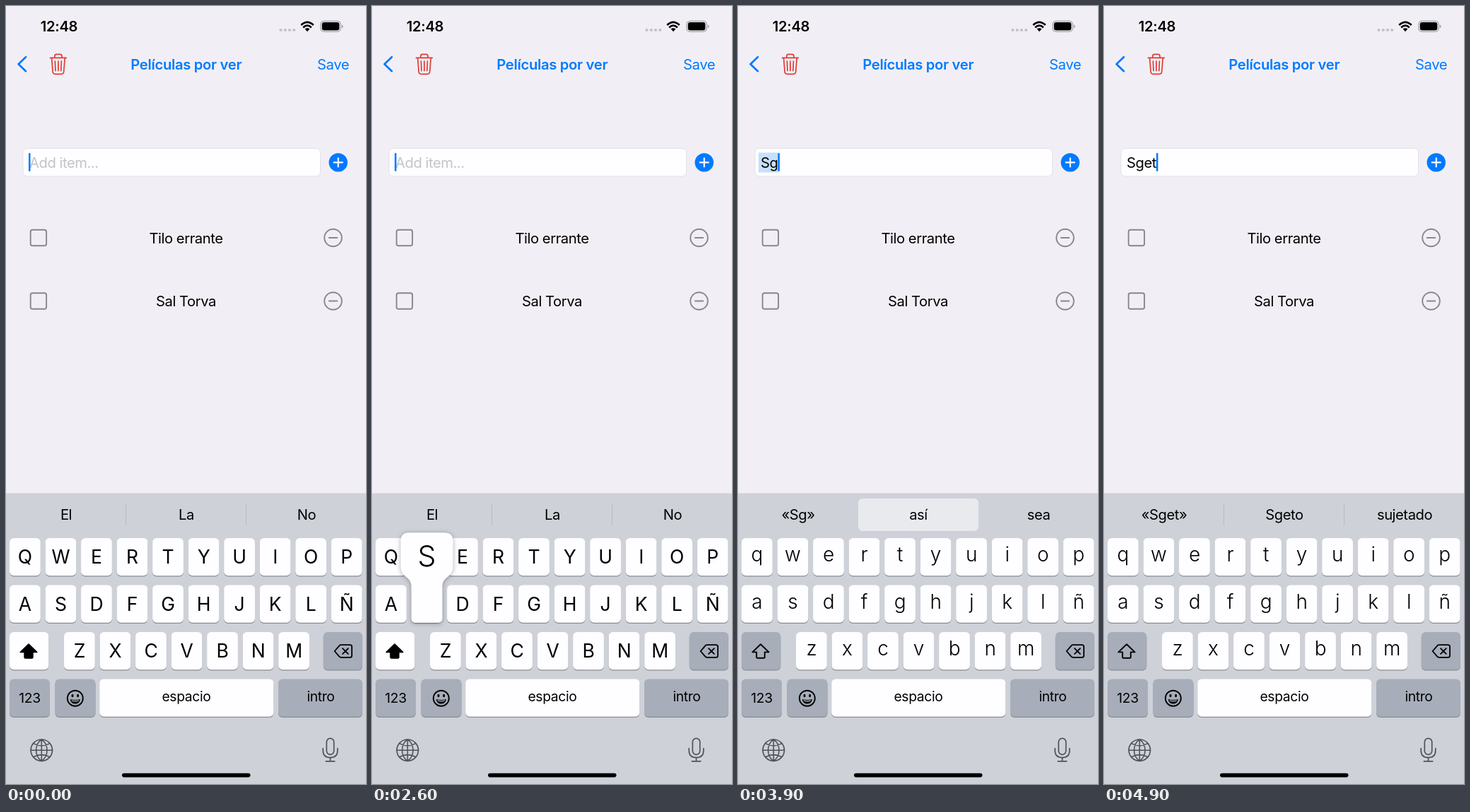
An HTML page that plays this animation: 509 px wide and 1101 px high, repeating every 5 s.

```html
<!DOCTYPE html>
<html lang="es">
<head>
<meta charset="utf-8">
<title>Lista</title>
<style>
  html, body { margin: 0; width: 100%; height: 100%; overflow: hidden; background: #f1eff5; }
  svg { display: block; width: 509px; height: 1101px; }
  text { font-family: Inter, "Open Sans", sans-serif; font-size: 20.2px; letter-spacing: -.45px; white-space: pre; }
  .mid { text-anchor: middle; }
  .bold { font-weight: 600; letter-spacing: -.3px; }
  .blue { fill: #007aff; }
  .upper { font-size: 26.5px; letter-spacing: 0; }
  .lower { font-size: 28px; font-weight: 300; letter-spacing: 0; }
  .big { font-size: 41px; font-weight: 300; letter-spacing: 0; }
  .label { font-size: 19.3px; letter-spacing: -.35px; }
  .line { fill: none; stroke-linecap: round; stroke-linejoin: round; }
  #pop { filter: drop-shadow(0 1px 3px rgba(0, 0, 0, .32)); }
</style>
</head>
<body>
<svg id="stage" viewBox="0 0 509 1101"></svg>
<script>
const LOOP = 5000;
const WHITE = '#fefdff', DARK = '#a7adb9', GREY = '#88878c', BLUE = '#007aff';

// Each table lists [start in ms, value]; a value holds until the next row.
const caretSteps = [[0, 1], [400, .67], [500, .33], [600, 0], [800, .5], [900, 1],
  [1400, .67], [1500, .33], [1600, 0], [1800, .5], [1900, 1],
  [2400, .67], [2500, .33], [2600, 1], [3200, .67], [3300, .33], [3400, 0], [3600, 1]];
const textSteps = [[0, ''], [2700, 'S'], [3700, 'Sg'], [4300, 'Sge'], [4600, 'Sget']];
const pressSteps = [[0, ''], [2600, 'S'], [2700, ''], [3600, 'g'], [3700, ''],
  [4200, 'e'], [4300, ''], [4500, 't'], [4600, '']];
const hintSteps = [[0, ['El', 'La', 'No']], [3000, ['«S»', 'si', 'se']], [3900, ['«Sg»', 'así', 'sea']],
  [4400, ['«Sge»', 'sea', 'Sgeto']], [4800, ['«Sget»', 'Sgeto', 'sujetado']]];
const markSteps = [[0, false], [3900, true], [4700, false]];
const lowerSteps = [[0, false], [2700, true]];

const at = (steps, t) => steps.filter(s => s[0] <= t).pop()[1];
const text = (x, y, str, cls = 'mid', extra = '') => `<text x="${x}" y="${y}" class="${cls}" ${extra}>${str}</text>`;
const box = (x, y, w, h, r, fill, extra = '') =>
  `<rect x="${x}" y="${y}" width="${w}" height="${h}" rx="${r}" fill="${fill}" ${extra}/>`;
const line = (d, color, width) => `<path class="line" d="${d}" stroke="${color}" stroke-width="${width}"/>`;
const ring = (x, y, r, color, width) =>
  `<circle cx="${x}" cy="${y}" r="${r}" fill="none" stroke="${color}" stroke-width="${width}"/>`;
const key = (x, y, w, fill = WHITE) => box(x, y + 1.3, w, 53.2, 6, '#898c92') + box(x, y, w, 53.2, 6, fill);

const keys = {};
const letterRow = (letters, x, y) => [...letters].map((ch, i) => {
  const left = x + i * 50.53, mid = left + 22;
  keys[ch] = keys[ch.toLowerCase()] = [mid, y];
  return key(left, y, 43.8) + text(mid, y + 36.2, ch, 'mid upper') +
    text(mid, y + 33.3, ch.toLowerCase(), 'mid lower');
}).join('');

const statusBar = () => text(75, 36, '12:48', 'mid bold') +
  [388.5, 394.8, 401, 407.2].map(x => `<circle cx="${x}" cy="34" r="2.1" fill="#c2c1c6"/>`).join('') +
  `<path d="M426 36.2 L422.6 32.6 Q426 29.8 429.4 32.6Z"/>` +
  `<g fill="none" stroke="#000" stroke-width="2.7"><path d="M417.3 27 Q426 18.6 434.7 27"/><path d="M420.2 30.4 Q426 25 431.8 30.4"/></g>` +
  box(444.8, 21.3, 28.4, 15, 4.8, 'none', 'stroke="#a5a4a9" stroke-width="1.2"') +
  box(446.7, 23.1, 24.6, 11.4, 3.2, '#000') +
  `<path d="M474.7 26.3 q2 .8 2 2.6 t-2 2.6z" fill="#a5a4a9"/>`;

const navBar = () => line('M28 72.3 L17.6 82.2 L28 92.2', BLUE, 2.7) +
  line('M62.5 73.4 H85.3 M64.6 73.6 L66.1 93 Q66.4 96.3 69.5 96.3 H78.3 Q81.4 96.3 81.7 93 L83.2 73.6 M68.8 73 V71 Q68.8 68.4 71.4 68.4 H76.4 Q79 68.4 79 71 V73 M69.4 78 L70 91.6 M73.9 78 V91.6 M78.4 78 L77.8 91.6', '#e23b35', 1.7) +
  text(254.7, 89.8, 'Películas por ver', 'mid bold blue') +
  text(485, 89.8, 'Save', 'blue', 'text-anchor="end"');

const listItem = (y, name) =>
  box(34.7, y - 11.2, 22.4, 22.4, 2.8, 'none', `stroke="${GREY}" stroke-width="1.9"`) +
  text(254.5, y + 7.5, name) + ring(462.5, y, 12.3, GREY, 1.9) +
  line(`M456.8 ${y} h11.4`, GREY, 1.9);

const field = () => box(24, 201.5, 420.5, 39.5, 6, WHITE, 'stroke="#e3e1e7" stroke-width="1"') +
  box(29, 207.5, 0, 28, 0, '#c7e0fb', 'id="sel"') +
  text(33, 229, 'Add item...', '', 'id="empty" fill="#c4c3c8"') +
  text(32, 229, '', '', 'id="typed"') +
  box(32, 208, 2.5, 26, 1.2, BLUE, 'id="caret"') +
  `<circle cx="469.7" cy="221.4" r="13.2" fill="${BLUE}"/>` +
  line('M463.6 221.4 h12.2 M469.7 215.3 v12.2', WHITE, 2.1);

const hints = () => `<path id="bars" d="M169.5 705 v30 M339.5 705 v30" stroke="#b8bbc2"/>` +
  box(170, 697, 170, 46, 6, '#e9eaee', 'id="glow"') +
  [85, 255, 425].map(x => text(x, 727.2, '', 'mid hint')).join('');

const arrow = 'M32 903.2 L43.6 914.4 H37.8 V921.4 Q37.8 922.8 36.4 922.8 H27.6 Q26.2 922.8 26.2 921.4 V914.4 H20.4 Z';
const shiftKey = () =>
  `<g class="up">${key(5, 886, 55.3)}<path d="${arrow}" stroke="#000" stroke-width="1.8" stroke-linejoin="round"/></g>` +
  `<g class="down">${key(5, 886, 55.3, DARK)}${line(arrow, '#000', 1.9)}</g>`;

const face = () => ring(97.8, 979.7, 11, '#000', 1.9) +
  `<ellipse cx="94" cy="976" rx="1.5" ry="2.2"/><ellipse cx="101.6" cy="976" rx="1.5" ry="2.2"/>` +
  `<path d="M90.6 981 Q97.8 983 105 981 Q103.8 987.6 97.8 987.6 Q91.8 987.6 90.6 981Z"/>` +
  `<path d="M92.4 982.3 Q97.8 983.8 103.2 982.3 L102.6 983.8 Q97.8 985 93 983.8Z" fill="${DARK}"/>`;

const keyboard = () => box(0, 689.5, 509, 411.5, 0, '#ced1d8') + hints() +
  letterRow('QWERTYUIOP', 5, 753) + letterRow('ASDFGHJKLÑ', 5, 819.6) + letterRow('ZXCVBNM', 82, 886) +
  shiftKey() + key(448.8, 886, 55.2, DARK) +
  line('M464.6 913 L471.2 905.3 Q472.2 904.2 473.6 904.2 H486.4 Q489 904.2 489 906.8 V919.2 Q489 921.8 486.4 921.8 H473.6 Q472.2 921.8 471.2 920.7 Z M476 909.1 l7.8 7.8 M483.8 909.1 l-7.8 7.8', '#000', 1.8) +
  key(5, 952.6, 57, DARK) + key(69.5, 952.6, 57, DARK) + key(132.2, 952.6, 246.2) + key(385, 952.6, 119, DARK) +
  text(33.5, 986.2, '123', 'mid label') + face() +
  text(255, 984.2, 'espacio', 'mid label') + text(445, 984.2, 'intro', 'mid label') +
  ring(50.3, 1053.2, 15.2, '#50535a', 1.7) +
  line('M50.3 1038 V1068.4 M35.1 1053.2 H65.5 M38.8 1043.6 Q50.3 1050 61.8 1043.6 M38.8 1062.8 Q50.3 1056.4 61.8 1062.8 M50.3 1038 C40 1045 40 1061.4 50.3 1068.4 M50.3 1038 C60.6 1045 60.6 1061.4 50.3 1068.4', '#50535a', 1.6) +
  box(453.3, 1036.3, 10.4, 23, 5.2, 'none', 'stroke="#50535a" stroke-width="1.7"') +
  line('M448.2 1050.5 V1053.5 Q448.2 1063.6 458.5 1063.6 Q468.8 1063.6 468.8 1053.5 V1050.5 M458.5 1063.6 V1068.8 M452.3 1068.8 H464.7', '#50535a', 1.7) +
  box(164, 1085.8, 181.5, 5.6, 2.8, '#000');

const bubble = 'M-37 -62 Q-37 -74.3 -25 -74.3 H25 Q37 -74.3 37 -62 V-27 C37 -18 33 -14.5 28 -10.5 C24 -7 21.9 -4 21.9 3 V47.2 Q21.9 53.2 15.9 53.2 H-15.9 Q-21.9 53.2 -21.9 47.2 V3 C-21.9 -4 -24 -7 -28 -10.5 C-33 -14.5 -37 -18 -37 -27 Z';
const popup = () => `<g id="pop"><path d="${bubble}" fill="${WHITE}"/>${text(0, -26.5, '', 'mid big', 'id="popText"')}</g>`;

const stage = document.getElementById('stage');
stage.innerHTML = statusBar() + navBar() + field() + listItem(328, 'Tilo errante') +
  listItem(417.5, 'Sal Torva') + keyboard() + popup();

const $ = id => document.getElementById(id);
const [sel, empty, typed, caret, bars, glow, pop, popText] =
  ['sel', 'empty', 'typed', 'caret', 'bars', 'glow', 'pop', 'popText'].map($);
const hintTexts = stage.querySelectorAll('.hint');
const upperParts = stage.querySelectorAll('.upper, .up');
const lowerParts = stage.querySelectorAll('.lower, .down');
const show = (el, on) => { el.style.display = on ? '' : 'none'; };

function draw(t) {
  const value = at(textSteps, t), press = at(pressSteps, t);
  const marked = at(markSteps, t), lower = at(lowerSteps, t);

  typed.textContent = value;
  show(empty, !value);
  const width = value ? typed.getComputedTextLength() : 0;
  caret.setAttribute('x', 32 + width);
  caret.setAttribute('opacity', at(caretSteps, t));
  sel.setAttribute('width', marked ? width + 4 : 0);

  at(hintSteps, t).forEach((word, i) => { hintTexts[i].textContent = word; });
  show(glow, marked);
  show(bars, !marked);
  upperParts.forEach(el => show(el, !lower));
  lowerParts.forEach(el => show(el, lower));

  show(pop, press);
  if (press) {
    popText.textContent = press;
    pop.setAttribute('transform', `translate(${keys[press]})`);
  }
}

function tick() {
  draw(performance.now() % LOOP);
  requestAnimationFrame(tick);
}
tick();
</script>
</body>
</html>
```
